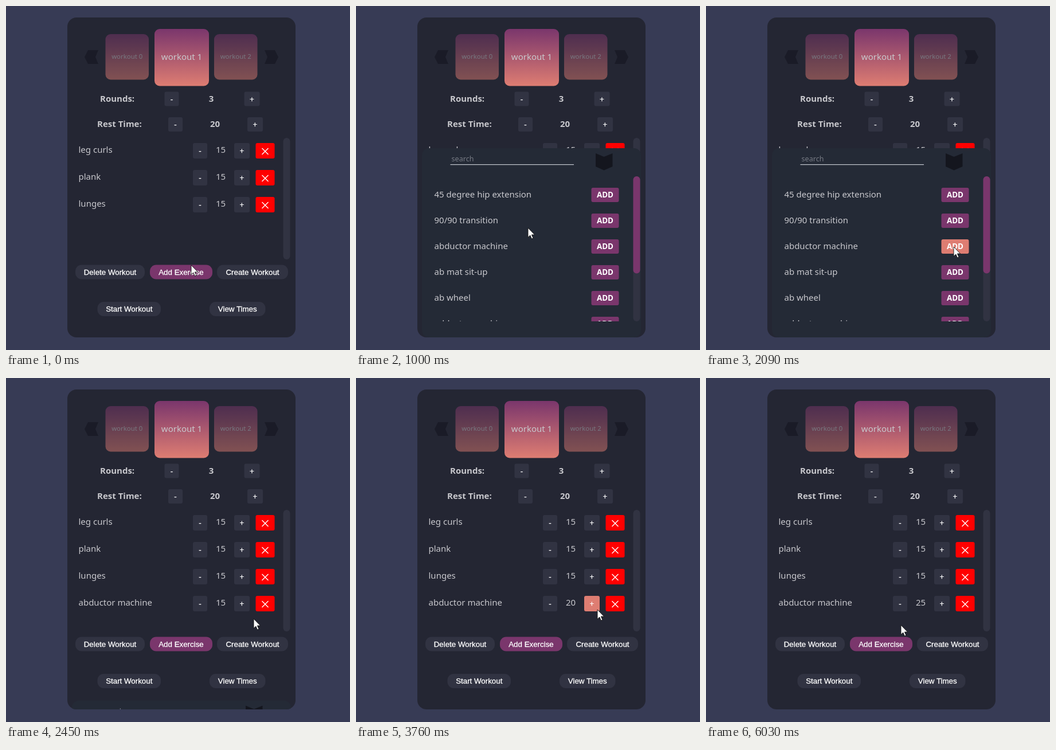
These frames come from a looping animation (600x600 px, 6120 ms). An HTML page:

```html
<!DOCTYPE html>
<html lang="en">
<head>
<meta charset="utf-8">
<title>Workout planner</title>
<style>
html, body { margin: 0; width: 100%; height: 100%; overflow: hidden; background: #373b55; }
svg { display: block; width: 600px; height: 600px; }
text { font: 15px "Noto Sans", "Open Sans", sans-serif; fill: #c8c8cd; white-space: pre; }
.mid { text-anchor: middle; }
.bold { font-weight: 700; }
.label { font: 13.33px "Liberation Sans", Arial, sans-serif; fill: #fff; stroke: #fff; stroke-width: .3px; }
.add { font-size: 13.4px; font-weight: 600; fill: #fff; }
.small { font-size: 11.4px; }
.hint { font-size: 12.6px; fill: #777b85; }
</style>
</head>
<body>
<svg viewBox="0 0 600 600">
  <defs>
    <linearGradient id="sunset" x2="0" y2="1">
      <stop stop-color="#7a366c"/><stop offset="1" stop-color="#de7d72"/>
    </linearGradient>
    <clipPath id="cardClip"><rect x="107" y="20" width="398" height="558" rx="16"/></clipPath>
    <clipPath id="listClip"><rect x="115" y="297" width="382" height="253"/></clipPath>
  </defs>
  <g clip-path="url(#cardClip)">
    <rect x="107" y="20" width="398" height="558" fill="#242633"/>
    <g id="main"></g>
    <g id="panel"></g>
  </g>
  <path id="cursor" d="M0 0V16.5L3.8 13L6.4 19L9 17.9L6.4 12H11.6Z" fill="#fff" stroke="#111" stroke-width=".9"/>
</svg>
<script>
const LOOP = 6120, GREY = "#313342", PURPLE = "#7a366c", SALMON = "#de7d72";
const $ = id => document.getElementById(id);

const rect = (x, y, w, h, r, fill, extra = "") =>
  `<rect x="${x}" y="${y}" width="${w}" height="${h}" rx="${r}" fill="${fill}" ${extra}/>`;
const text = (x, y, s, cls = "", extra = "") =>
  `<text x="${x}" y="${y}" class="${cls}" ${extra}>${s}</text>`;
const button = (x, y, w, h, r, s, fill = GREY, cls = "label", extra = "") =>
  rect(x, y, w, h, r, fill, extra) + text(x + w / 2, y + h / 2 + 4.6, s, cls + " mid");
const shape = (points, fill) => `<polygon points="${points}" fill="${fill}"/>`;

const tile = (x, y, w, h, s, cls, base) =>
  rect(x, y, w, h, 9, "url(#sunset)") + text(x + w / 2, base, s, cls + " mid");

const setting = (y, name, nameX, minusX, value, valueX, plusX) =>
  text(nameX, y + 17, name, "bold") + button(minusX, y, 25, 25, 3, "-") +
  text(valueX, y + 17, value, "bold mid") + button(plusX, y, 27, 25, 3, "+");

function exercise(name, i) {
  const y = 239 + 47 * i, last = i === 3;
  return `<g ${last ? 'id="added"' : ""}>` + text(126.5, y + 17, name) +
    button(326, y, 25, 27, 3, "-") +
    text(374.5, y + 17, "15", "mid", last ? 'id="count"' : "") +
    button(398, y, 27, 27, 3, "+", GREY, "label", last ? 'id="plus"' : "") +
    rect(435.5, y, 33, 27, 3, "#f00") +
    `<path d="M446.5 ${y + 9}l11 11m0-11l-11 11" stroke="#fff" stroke-width="1.4"/></g>`;
}

const option = (name, i) =>
  text(136.5, 334 + 45 * i, name) +
  button(410.5, 317 + 45 * i, 48, 25, 3, "ADD", PURPLE, "add", `id="add${i}"`);

$("main").innerHTML =
  shape("143,77 161,77 156,89 161,101 143,101 137,89", "#1a1b27") +
  shape("451,77 469,77 475,89 469,101 451,101 456,89", "#1a1b27") +
  `<g opacity=".5">` + tile(173.5, 49, 75.5, 79.5, "workout 0", "small", 91.5) +
  tile(363, 49, 75.5, 79.5, "workout 2", "small", 91.5) + `</g>` +
  tile(259, 40, 95, 99.5, "workout 1", "", 93.5) +
  setting(149.5, "Rounds:", 164, 276.5, 3, 358, 415.5) +
  setting(194, "Rest Time:", 159, 283, 20, 364.5, 421) +
  rect(483.5, 230, 12, 212, 6, GREY) +
  ["leg curls", "plank", "lunges", "abductor machine"].map(exercise).join("") +
  button(121, 451.5, 121, 25, 11, "Delete Workout") +
  button(251, 451.5, 109, 25, 11, "Add Exercise", PURPLE) +
  button(368, 451.5, 124, 25, 11, "Create Workout") +
  button(159.5, 516, 110.5, 25, 11, "Start Workout") +
  button(355, 516, 97.5, 25, 11, "View Times");

$("panel").innerHTML =
  rect(115, 248, 382, 330, 12, "#242a36") +
  text(166.5, 271, "search", "hint") + rect(164.5, 276, 215.5, 1.2, 0, "#c3c7cf") +
  shape("418,257 432.5,263 447.5,257 447.5,280 432.5,286.5 418,280", "#14161e") +
  `<g clip-path="url(#listClip)">` +
  ["45 degree hip extension", "90/90 transition", "abductor machine",
   "ab mat sit-up", "ab wheel", "adductor machine"].map(option).join("") + `</g>` +
  rect(483.5, 297, 12, 253, 6, GREY) + rect(483.5, 297, 12, 169.5, 6, PURPLE);

// time, x, y of the pointer tip
const path = [
  [0, 323, 452], [550, 322, 454], [700, 322, 454], [1000, 300, 387], [1270, 300, 387],
  [1750, 432, 420], [2600, 432, 420], [3180, 421, 404], [4150, 421, 404],
  [4360, 331, 429], [5000, 340, 431], [LOOP, 340, 431]
];

const ramp = (t, start, length) => Math.min(1, Math.max(0, (t - start) / length));

// the standard CSS "ease" curve
function ease(x) {
  let lo = 0, hi = 1, s = x;
  for (let i = 0; i < 20; i++) {
    s = (lo + hi) / 2;
    if (.75 * s * (1 - s) + s ** 3 < x) lo = s; else hi = s;
  }
  return .3 * s * (1 - s) ** 2 + 3 * s * s * (1 - s) + s ** 3;
}

function pointer(t) {
  const i = path.findIndex(p => p[0] > t), [a, b] = [path[i - 1], path[i]];
  let k = ramp(t, a[0], b[0] - a[0]);
  k = k * k * (3 - 2 * k);
  return [a[1] + (b[1] - a[1]) * k, a[2] + (b[2] - a[2]) * k];
}

const mix = (a, b, k) => `rgb(${a.map((v, i) => Math.round(v + (b[i] - v) * k))})`;

function draw(t) {
  const [x, y] = pointer(t);
  $("cursor").setAttribute("transform", `translate(${x} ${y})`);

  const open = ease(ramp(t, 405, 500)) - ease(ramp(t, 2100, 500));
  const drop = 334 * (1 - open);
  $("panel").setAttribute("transform", `translate(0 ${drop})`);

  const over = x >= 411 && x <= 458 && y >= 407 + drop && y <= 432 + drop;
  $("add2").setAttribute("fill", over ? SALMON : PURPLE);

  $("added").setAttribute("visibility", t < 2100 ? "hidden" : "visible");
  $("count").textContent = t < 3500 ? 15 : t < 3830 ? 20 : 25;
  const warm = ramp(t, 3250, 150) - ramp(t, 4190, 180);
  $("plus").setAttribute("fill", mix([49, 51, 66], [222, 125, 114], warm));
}

function frame(now) {
  draw(now % LOOP);
  requestAnimationFrame(frame);
}
draw(0);
requestAnimationFrame(frame);
</script>
</body>
</html>
```
